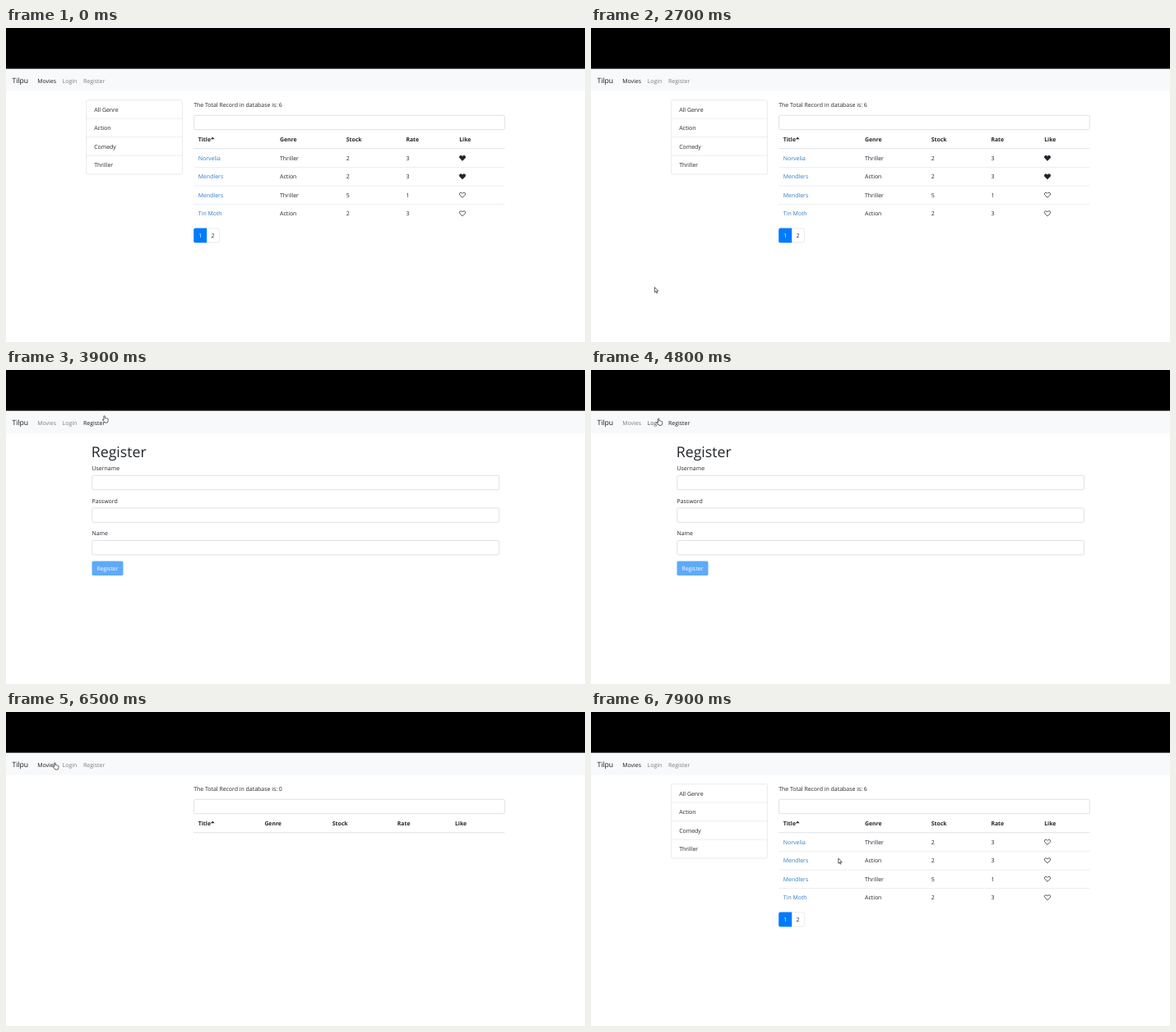
Recreate the animation shown at these times as an HTML page. Size 704 px wide and 382 px high, loop 8 s.

```html
<!DOCTYPE html>
<html lang="en">
<head>
<meta charset="utf-8">
<title>Movie list</title>
<style>
  html, body { margin: 0; height: 100%; overflow: hidden; background: #fff; }
  svg { display: block; width: 100vw; height: 100vh; }
  text { font: 6.94px "Open Sans", "Noto Sans", sans-serif; fill: #212529; text-rendering: geometricPrecision; }
  .brand { font-size: 8.67px; fill: #1a1a1a; }
  .title { font-size: 17.7px; }
  .head { font-size: 6.85px; font-weight: 700; }
  .link { fill: #2f7cc6; }
  .light { fill: #fff; }
  .mid { text-anchor: middle; }
  .field { fill: #fff; stroke: #ced4da; stroke-width: .7; }
  .card { fill: #fff; stroke: #dcdcdc; stroke-width: .6; }
  .rule { stroke: #dee2e6; stroke-width: .6; }
  .thick { stroke-width: 1; }
  .heart { stroke: #212529; stroke-width: .8; stroke-linejoin: round; }
</style>
</head>
<body>
<svg id="stage" viewBox="0 0 704 382" preserveAspectRatio="none"></svg>
<script>
const stage = document.getElementById('stage');

const text = (x, y, value, cls = '') => `<text x="${x}" y="${y}" class="${cls}">${value}</text>`;
const rect = (x, y, w, h, attrs) => `<rect x="${x}" y="${y}" width="${w}" height="${h}" ${attrs}/>`;
const rule = (x1, x2, y, cls = '') => `<line x1="${x1}" x2="${x2}" y1="${y}" y2="${y}" class="rule ${cls}"/>`;
const field = (x, y, w) => rect(x, y, w, 17.4, 'rx="1.8" class="field"');

const ROW = 22.47;
const genres = ['All Genre', 'Action', 'Comedy', 'Thriller'];
const headings = ['Title', 'Genre', 'Stock', 'Rate', 'Like'];
const movies = [
  ['Norvelia', 'Thriller', 2, 3],
  ['Mendlers', 'Action', 2, 3],
  ['Mendlers', 'Thriller', 5, 1],
  ['Tin Moth', 'Action', 2, 3],
];

const heart = (x, y, filled) => `<path class="heart" fill="${filled ? '#212529' : 'none'}"
  transform="translate(${x} ${y})"
  d="M0 3.1L-3.1 0C-4.4-1.5-3.3-3-1.9-3C-1-3-.4-2.5 0-1.9C.4-2.5 1-3 1.9-3C3.3-3 4.4-1.5 3.1 0Z"/>`;

const tableTop = (count, columns) =>
  text(228.2, 96, `The Total Record in database is: ${count}`) +
  field(228.5, 106.3, 377.8) +
  headings.map((h, i) => text(columns[i], 138, h, 'head')).join('') +
  '<path d="M248.8 135.2L251.2 132.7L253.6 135.2Z" fill="#212529"/>' +
  rule(228.2, 606.5, 146.7, 'thick');

function sidebar() {
  const items = genres.map((g, i) =>
    (i ? rule(97.7, 214.4, 87.7 + i * ROW) : '') + text(107.2, 102 + i * ROW, g));
  return rect(97.7, 87.7, 116.7, 90.3, 'rx="1.8" class="card"') + items.join('');
}

function pagination() {
  return rect(228.5, 243.8, 30.9, 17.2, 'rx="1.8" class="card"') +
    '<path d="M244.2 243.5V261.3H230.2Q228.2 261.3 228.2 259.3V245.5Q228.2 243.5 230.2 243.5Z" fill="#007bff"/>' +
    text(236.2, 255.3, 1, 'mid light') + text(251.6, 255.3, 2, 'mid');
}

function moviesPage(likedRows) {
  const columns = [233.8, 333, 413.8, 486.4, 551.2];
  const rows = movies.map((movie, i) => {
    const y = 160.7 + i * ROW;
    return (i ? rule(228.2, 606.5, y - 13.6) : '') +
      movie.map((v, c) => text(columns[c], y, v, c ? '' : 'link')).join('') +
      heart(555, y - 2.4, i < likedRows);
  });
  return sidebar() + tableTop(6, columns) + rows.join('') + pagination();
}

function formPage(title, labels, button, buttonWidth) {
  const fields = labels.map((label, i) =>
    text(104.5, 122 + i * 39.6, label) + field(104.8, 128.3 + i * 39.6, 494.8));
  const y = 153.2 + labels.length * 39.6 - 39.6;
  return text(103.8, 106, title, 'title') + fields.join('') +
    rect(104.5, y, buttonWidth, 17.6, 'rx="1.8" fill="#5eaaf8"') +
    text(104.5 + buttonWidth / 2, y + 11.3, button, 'mid light');
}

const pages = {
  liked: moviesPage(2),
  register: formPage('Register', ['Username', 'Password', 'Name'], 'Register', 38),
  login: formPage('Login', ['Username', 'Password'], 'Submit', 35),
  empty: tableTop(0, [233.8, 314.4, 396.8, 475.8, 546]),
  movies: moviesPage(0),
};

// start time, page, index of the active navigation link
const schedule = [
  [0, 'liked', 0], [3900, 'register', 2], [5300, 'login', 1], [6500, 'empty', 0], [7600, 'movies', 0],
];

// label, text x, left and right edge of the hover area
const navLinks = [['Movies', 38.3, 34.7, 65], ['Login', 68.6, 65, 90.4], ['Register', 94, 90.4, 124]];

// time, x, y of the pointer's top left corner
const pointerPath = [
  [1800, 70.4, 353.6], [1900, 194, 337], [2100, 48, 362], [2200, 88, 366], [2500, 88, 366],
  [2700, 77, 315], [2800, 77, 315], [2900, 66, 255], [3000, 54, 175], [3100, 60, 105],
  [3200, 80, 78], [3300, 102, 61], [3400, 117.2, 55], [4400, 117.2, 55], [4800, 79.8, 58.3],
  [5400, 79.8, 58.3], [5900, 57, 61], [6600, 57, 61], [6700, 63, 67], [7100, 200, 150],
  [7500, 353, 183], [7900, 300.4, 177.6],
];

stage.innerHTML =
  rect(0, 0, 704, 382, 'fill="#fff"') +
  rect(0, 49, 704, 27.6, 'fill="#f8f9fb"') +
  rect(0, 0, 704, 49.6, 'fill="#000"') +
  text(7.4, 67.3, 'Tilpu', 'brand') +
  navLinks.map(([label, x]) => text(x, 66.5, label, 'nav')).join('') +
  Object.entries(pages).map(([name, body]) => `<g id="${name}">${body}</g>`).join('') +
  `<g id="pointer" fill="#fff" stroke="#222" stroke-width=".7" stroke-linejoin="round">
    <path id="arrow" d="M.4.4V6.6L1.8 5.3L2.8 7.5L3.8 7L2.8 4.9H4.7Z"/>
    <path id="hand" d="M1.7 5.6V1.1Q2.4 0 3.1 1.1V3.5Q4 3 4.4 3.8Q5.3 3.4 5.7 4.1Q6.7 3.9 6.9 4.8V6.6Q6.8 8 6 9H2.8Q1.9 7.5.6 6.2Q0 5 .8 5Z"/>
  </g>`;

const byId = id => document.getElementById(id);
const navTexts = stage.querySelectorAll('.nav');
const show = (element, visible) => { element.style.display = visible ? '' : 'none'; };

function pointerAt(time) {
  const next = pointerPath.findIndex(p => p[0] > time);
  if (next === 0) return null;
  if (next < 0) return pointerPath.at(-1).slice(1);
  const [t0, x0, y0] = pointerPath[next - 1];
  const [t1, x1, y1] = pointerPath[next];
  const k = (time - t0) / (t1 - t0);
  return [x0 + (x1 - x0) * k, y0 + (y1 - y0) * k];
}

function draw(now) {
  const time = Math.floor(now % 8000 / 100) * 100;
  const [, page, active] = schedule.findLast(s => s[0] <= time);
  for (const name in pages) show(byId(name), name === page);

  const pointer = pointerAt(time);
  let hovered = -1;
  show(byId('pointer'), pointer);
  if (pointer) {
    const [x, y] = pointer;
    const tip = x + 2.4;
    if (y > 54 && y < 72) hovered = navLinks.findIndex(([, , left, right]) => tip >= left && tip < right);
    byId('pointer').setAttribute('transform', `translate(${x} ${y})`);
    show(byId('hand'), hovered >= 0);
    show(byId('arrow'), hovered < 0);
  }

  navTexts.forEach((link, i) => {
    link.style.fill = `rgba(0,0,0,${i === active ? .9 : i === hovered ? .7 : .5})`;
  });
  requestAnimationFrame(draw);
}
draw(0);
</script>
</body>
</html>
```
